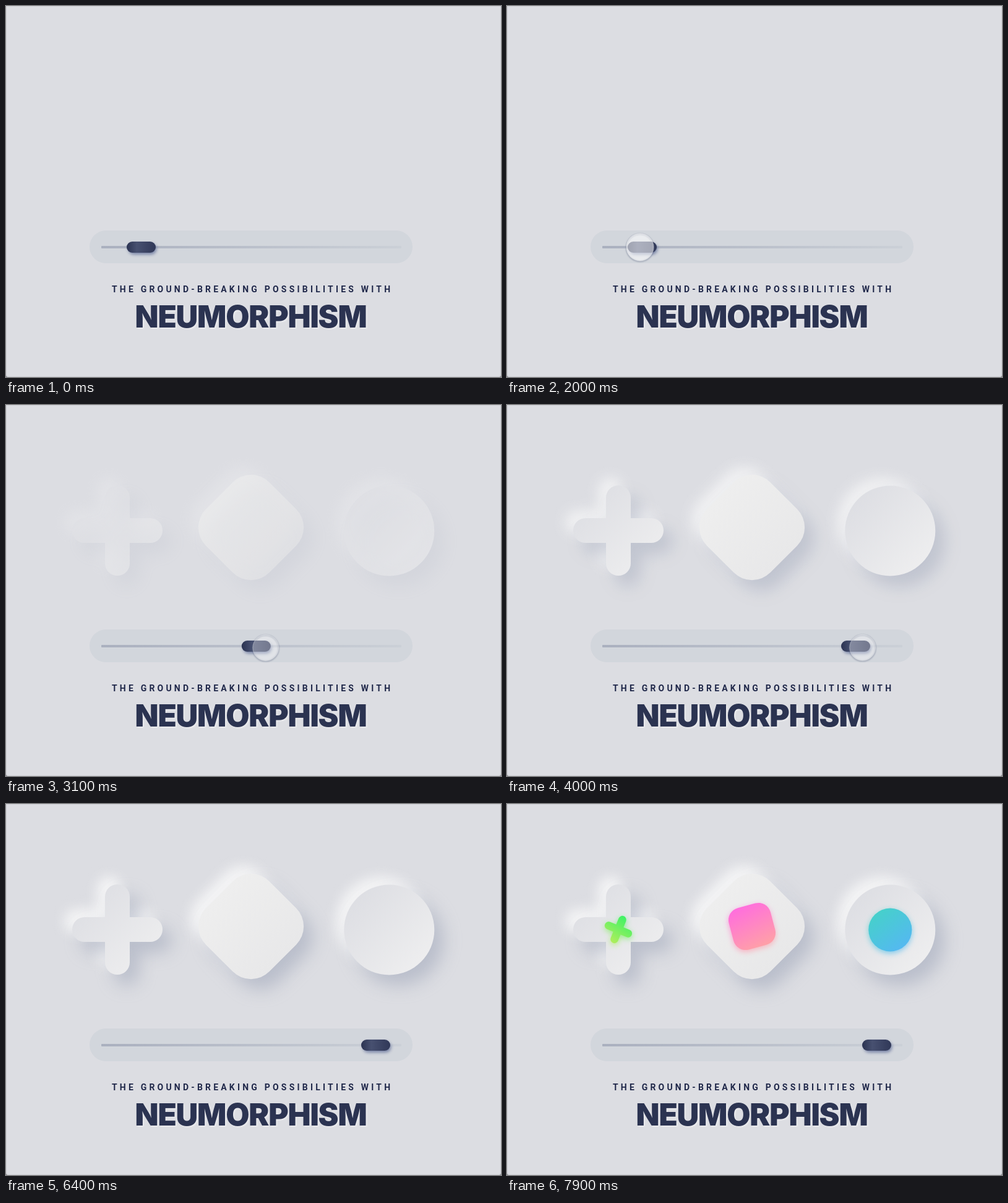
An HTML page that plays this animation: 800 by 600 pixels, repeating every 8000 ms.

```html
<!DOCTYPE html>
<html lang="en">
<head>
<meta charset="utf-8">
<title>Neumorphism</title>
<style>
  html, body { margin: 0; width: 100%; height: 100%; overflow: hidden; background: #8d8e93; }
  svg { display: block; width: 100vw; height: 100vh; }
  .kicker { font: 600 14px Roboto, sans-serif; letter-spacing: 4.2px; fill: #20284a; }
  .title { font: 900 49.5px Inter, sans-serif; letter-spacing: -1.2px; fill: #2b3351; text-shadow: 2px 2px 2px rgba(255, 255, 255, .4); }
  .light { fill: #fafafa; filter: blur(10px); }
  .dark { fill: #8b95ad; filter: blur(14px); }
  .glow { filter: blur(5px); opacity: .7; }
  .knob-shadow { fill: #4c5b8c; opacity: .65; filter: blur(2.5px); }
  .ring-shadow { fill: none; stroke: #56607c; stroke-width: 2; opacity: .45; filter: blur(1.2px); }
</style>
</head>
<body>
<svg viewBox="0 0 800 600">
  <defs>
    <path id="plus" d="M-20-53a20 20 0 0 1 40 0V-20H53a20 20 0 0 1 0 40H20V53a20 20 0 0 1-40 0V20H-53a20 20 0 0 1 0-40H-20Z"/>
    <rect id="square" x="-72.5" y="-72.5" width="145" height="145" rx="42"/>
    <circle id="disc" r="73"/>

    <linearGradient id="face" x1=".12" y1=".12" x2=".88" y2=".88">
      <stop stop-color="#dddee3"/><stop offset="1" stop-color="#eeeeef"/>
    </linearGradient>
    <linearGradient id="squareFace" x1="0" y1=".5" x2="1" y2=".5">
      <stop stop-color="#eeeeee"/><stop offset="1" stop-color="#e8e8e9"/>
    </linearGradient>
    <linearGradient id="green" x1=".6" y1="0" x2=".4" y2="1">
      <stop stop-color="#3cf266"/><stop offset="1" stop-color="#b2ee5c"/>
    </linearGradient>
    <linearGradient id="pink" x1=".4" y1="0" x2=".6" y2="1">
      <stop stop-color="#ff6fdc"/><stop offset="1" stop-color="#ff9fa8"/>
    </linearGradient>
    <linearGradient id="blue" x1=".2" y1=".1" x2=".8" y2=".9">
      <stop stop-color="#46d0cb"/><stop offset="1" stop-color="#54b9f0"/>
    </linearGradient>
    <linearGradient id="rail">
      <stop stop-color="#aab0bf"/><stop offset="1" stop-color="#cbd0d7"/>
    </linearGradient>
    <linearGradient id="knobFill">
      <stop stop-color="#2b3352"/><stop offset=".35" stop-color="#475070"/><stop offset="1" stop-color="#303858"/>
    </linearGradient>
  </defs>

  <path d="M0 0H800V596Q800 600 796 600H4Q0 600 0 596Z" fill="#dcdde2"/>
  <path d="M.5.5H799.5V596Q799.5 599.5 796 599.5H4Q.5 599.5.5 596Z" fill="none" stroke="#cfd0d5"/>

  <g id="shapes"></g>

  <rect x="135" y="363" width="522" height="53" rx="26.5" fill="#d2d6dc"/>
  <rect x="154" y="388" width="485" height="4" rx="1" fill="url(#rail)"/>
  <g id="knob">
    <rect class="knob-shadow" x="-21" y="-6" width="46" height="18" rx="9"/>
    <rect x="-23.5" y="-9" width="47" height="18" rx="9" fill="url(#knobFill)"/>
  </g>

  <text class="kicker" x="171" y="463">THE GROUND-BREAKING POSSIBILITIES WITH</text>
  <text class="title" x="395.5" y="519.5" text-anchor="middle">NEUMORPHISM</text>

  <g id="inners"></g>

  <g id="cursor">
    <circle class="ring-shadow" r="22" cy="1"/>
    <circle id="lens" r="22" fill="#fff" stroke="#fff" stroke-opacity=".35"/>
  </g>
</svg>
<script>
const LOOP = 8000, STEP = 100;
const $ = id => document.getElementById(id);

const mix = (a, b, u) => a + (b - a) * u;
const ramp = (t, from, to) => Math.min(1, Math.max(0, (t - from) / (to - from)));
const smooth = u => u * u * (3 - 2 * u);
const ease = (t, from, to) => smooth(ramp(t, from, to));
const place = (x, y, turn, scale = 1) => `translate(${x} ${y}) rotate(${turn}) scale(${scale})`;

const shapes = [
  { id: 'plus', x: 180, y: 203, turn: 0, face: 'face', tint: 'green', start: 7500, size: .32, spin: [-45, 22] },
  { id: 'square', x: 396, y: 198, turn: 45, face: 'squareFace', tint: 'pink', start: 7400, size: .48, spin: [-60, -15] },
  { id: 'disc', x: 619.3, y: 203.5, turn: 0, face: 'face', tint: 'blue', start: 7400, size: .48, spin: [0, 0] }
];

for (const s of shapes) {
  const layer = (name, dx, dy, extra) =>
    `<g class="${name}"><use href="#${s.id}" transform="${place(s.x + dx, s.y + dy, s.turn)}" ${extra}/></g>`;
  $('shapes').insertAdjacentHTML('beforeend',
    layer('shade light', -13, -13, 'opacity=".8"') +
    layer('shade dark', 15, 17, 'opacity=".42"') +
    layer('top', 0, 0, `fill="url(#${s.face})"`));

  const fit = `<g class="fit"><use href="#${s.id}" fill="url(#${s.tint})"/></g>`;
  $('inners').insertAdjacentHTML('beforeend',
    `<g><g class="glow" transform="translate(0 3)">${fit}</g>${fit}</g>`);
  s.group = $('inners').lastElementChild;
  s.fits = s.group.querySelectorAll('.fit');
}
const shades = document.querySelectorAll('.shade'), tops = document.querySelectorAll('.top');

// First visit drags the knob, the second one taps the middle shape.
function cursorAt(t, progress, knobX) {
  if (t < 6500) {
    const away = 1 - ease(t, 1000, 1900), leave = ease(t, 5500, 6300);
    const sway = Math.sin(Math.PI * progress);
    const grip = ease(t, 2000, 2300) - leave;
    return {
      x: knobX - 3.5 + 12 * progress + 13 * sway + 123 * away - 9 * leave,
      y: 390 + 2 * progress + 1.5 * sway + 118 * away + 80 * leave,
      alpha: ramp(t, 900, 1200) * (1 - ramp(t, 5800, 6300)),
      fill: mix(.55, .32, grip),
      size: 1 - .05 * grip
    };
  }
  const arrive = ease(t, 6500, 7100);
  return {
    x: mix(440, 408, arrive),
    y: mix(467, 211, arrive),
    alpha: ramp(t, 6500, 6800) * (1 - ramp(t, 7400, 7700)),
    fill: .75,
    size: 1 - .08 * ease(t, 7200, 7400)
  };
}

function draw(t) {
  const progress = smooth(ramp(t, 2000, 4550) ** .84);
  const knobX = mix(218.5, 597.5, progress);
  $('knob').setAttribute('transform', `translate(${knobX} 390)`);
  shades.forEach(el => el.style.opacity = progress ** 2);
  tops.forEach(el => el.style.opacity = Math.min(1, progress * 1.2));

  const c = cursorAt(t, progress, knobX);
  $('cursor').setAttribute('transform', place(c.x, c.y, 0, c.size));
  $('cursor').style.opacity = c.alpha;
  $('lens').setAttribute('fill-opacity', c.fill);

  for (const s of shapes) {
    const grow = ease(t, s.start, 7900);
    s.group.style.display = grow > 0 ? '' : 'none';
    s.fits.forEach(el => el.setAttribute('transform', place(s.x, s.y, mix(...s.spin, grow), s.size * grow)));
  }
}

const start = performance.now();
function tick() {
  const t = (performance.now() - start) % LOOP;
  draw(Math.floor(t / STEP) * STEP);
  requestAnimationFrame(tick);
}
tick();
</script>
</body>
</html>
```
